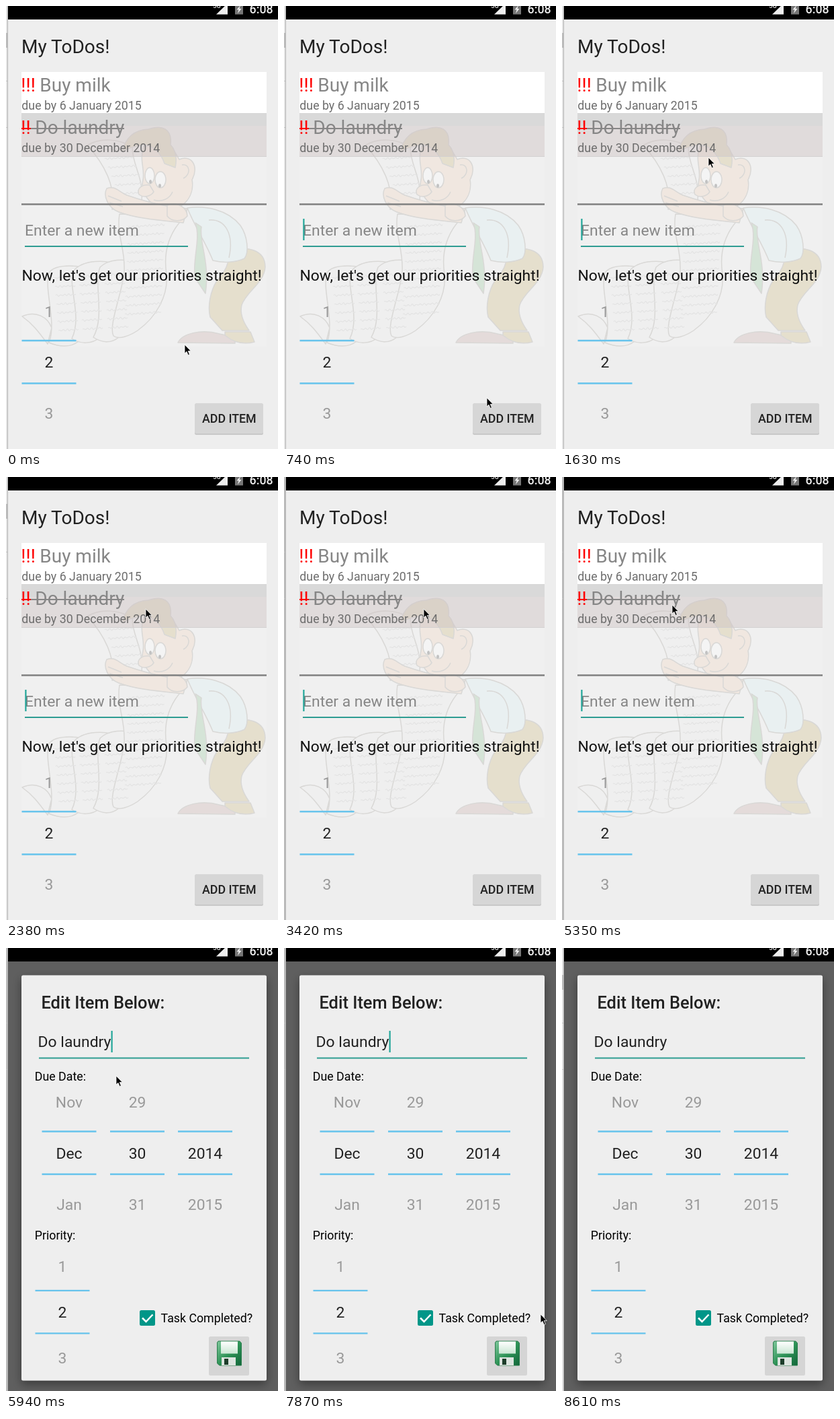
An HTML page that plays this animation: 405 by 658 pixels, repeating every 8660 ms.

```html
<!DOCTYPE html>
<html lang="en">
<head>
<meta charset="utf-8">
<title>To-do list</title>
<style>
  html, body { margin: 0; width: 100%; height: 100%; overflow: hidden; background: #eee; }
  svg { display: block; width: 405px; height: 658px; font: 22.9px Roboto, sans-serif; fill: #212121; }
  .big { font-size: 28px; }
  .small { font-size: 17.8px; }
  .medium { font-weight: 500; }
  .mid { text-anchor: middle; }
  .gray { fill: #868686; }
  .red { fill: #f00; }
  .art { stroke: #d9d8d6; stroke-width: 1.5; stroke-linejoin: round; }
  .paper { fill: #efefef; }
  .skin { fill: #f0e7e0; }
  .tan { fill: #e5dfcd; }
</style>
</head>
<body>
<svg viewBox="0 0 405 658">
  <defs>
    <filter id="shadow" x="-10%" y="-10%" width="120%" height="120%">
      <feDropShadow dx="0" dy="5" stdDeviation="7" flood-opacity=".4"/>
    </filter>
    <linearGradient id="green" x2="1" y2="1">
      <stop stop-color="#7fc79b"/><stop offset=".5" stop-color="#2f9458"/><stop offset="1" stop-color="#12673a"/>
    </linearGradient>
    <linearGradient id="label" y2="1" x2="0">
      <stop stop-color="#fff"/><stop offset="1" stop-color="#c9e6d3"/>
    </linearGradient>
  </defs>
  <rect width="405" height="658" fill="#eee"/>

  <g id="list">
    <rect x="23" y="178" width="365" height="328" fill="#f0f0f0"/>
    <g class="art">
      <!-- paper scroll -->
      <path class="paper" d="M24 461C45 452 62 462 68 478L62 502C50 486 42 474 24 461Z"/>
      <path class="paper" d="M64 500C76 470 56 420 64 396C74 382 116 384 126 394C106 420 128 462 108 498C96 508 78 506 64 500Z"/>
      <path class="paper" d="M98 494C114 462 92 416 100 394C114 376 152 376 168 386C144 416 164 462 140 492C128 503 110 502 98 494Z"/>
      <path class="paper" d="M130 492C148 460 130 414 140 388C152 376 178 374 192 382C174 416 192 460 168 492C156 502 142 500 130 492Z"/>
      <path class="paper" d="M169 309L268 311C242 336 234 366 239 398C242 430 224 462 196 482C184 490 168 496 160 490C152 474 174 424 176 394C178 360 164 340 169 309Z"/>
      <path class="paper" d="M121 207C140 195 170 197 188 210C188 238 208 258 201 296L158 302C164 268 146 234 121 207Z"/>
      <path id="scribble" fill="none" stroke="#e3e3e3" stroke-width="1.2"/>
      <!-- trousers and shoes -->
      <path class="tan" d="M330 366C358 354 386 362 386 388C384 412 358 424 351 444C348 456 352 468 362 482H322L304 462C300 446 304 424 314 408C326 394 334 382 330 366Z"/>
      <path fill="#e4dbda" d="M256 500C262 487 290 479 318 487L341 492V501Z"/>
      <path class="tan" d="M326 484H364L370 499C355 503 340 501 326 489Z"/>
      <!-- shirt and tie -->
      <path fill="#e9f0f1" d="M270 300C296 296 330 302 349 326C360 342 362 366 355 375C342 381 324 382 308 378C298 352 282 330 270 300Z"/>
      <path fill="none" d="M302 318C326 316 340 338 332 374"/>
      <path fill="#d5e4d7" d="M282 322L291 328C287 350 304 380 297 427L281 403C278 374 290 346 282 322Z"/>
      <!-- head -->
      <path class="skin" d="M205 208C198 230 207 240 204 258C200 276 212 294 232 302C258 308 282 286 277 258C288 238 276 220 258 228L246 208Z"/>
      <path class="tan" d="M173 216C178 196 190 184 212 183C232 176 248 182 245 206C253 215 255 226 252 240L236 234C232 222 222 207 205 206C192 208 182 211 173 216Z"/>
      <path fill="none" d="M262 236C274 234 276 250 264 256"/>
      <ellipse cx="214" cy="252" rx="7" ry="12" fill="#f4f4f4"/>
      <ellipse cx="230" cy="258" rx="8" ry="12" fill="#f4f4f4"/>
      <path fill="#c2c2c2" stroke="none" d="M215 258a2 3 0 1 0 .1 0ZM229 264a2 3 0 1 0 .1 0Z"/>
      <path class="skin" d="M214 266C202 264 194 272 198 280C206 286 216 282 220 276Z"/>
      <path fill="none" d="M220 288C232 292 244 286 248 276"/>
      <!-- hands -->
      <path class="skin" d="M150 271C162 266 168 276 180 281C200 288 222 294 244 298L270 301L264 322C226 318 196 316 168 306C152 300 144 282 150 271Z"/>
      <path class="skin" d="M240 296C252 290 270 298 270 312C262 322 246 320 240 312Z"/>
      <path fill="none" d="M152 282L172 290M154 292L174 298"/>
    </g>

    <rect x="23" y="98" width="365" height="61" fill="#fff"/>
    <path d="M23 160H388" stroke="#d8d8d8" stroke-width="2"/>
    <rect x="23" y="161" width="365" height="17" fill="#d9d9d9"/>
    <rect x="23" y="178" width="365" height="45" fill="#ccc1c0" fill-opacity=".45"/>
    <path d="M23 223.5H388" stroke="#d2d0d0"/>

    <text class="big" x="23" y="70">My ToDos!</text>
    <text class="big red" x="22.3" y="127">!!!</text>
    <text class="big gray" x="50.3" y="127">Buy milk</text>
    <text class="small" x="23.3" y="154" fill="#6d6d6d">due by 6 January 2015</text>
    <text class="big red" x="22.3" y="190">!!</text>
    <text class="big gray" x="43.3" y="190">Do laundry</text>
    <path d="M23 182H37" stroke="#f00" stroke-width="2"/>
    <path d="M37 182H176" stroke="#868686" stroke-width="2"/>
    <text class="small" x="23.3" y="217" fill="#6d6d6d">due by 30 December 2014</text>
    <path d="M23 294.5H388" stroke="#808080" stroke-width="2.5"/>
    <text class="gray" x="28" y="341">Enter a new item</text>
    <path d="M28 357H271" stroke="#2f9d92" stroke-width="2"/>
    <text x="23.4" y="408" fill="#111">Now, let's get our priorities straight!</text>
    <rect x="281" y="591" width="102" height="46" rx="2.5" fill="#c8c8c8"/>
    <rect x="281" y="590" width="102" height="45" rx="2.5" fill="#d6d6d6"/>
    <text class="small medium mid" x="332.3" y="619">ADD ITEM</text>
    <rect class="caret" x="28.3" y="316" width="2.2" height="32" fill="#22a699"/>
  </g>

  <g id="dialog">
    <rect x="3" y="20" width="402" height="638" fill="#5f5f5f"/>
    <rect x="23" y="40.5" width="365" height="602" rx="2.5" fill="#eee" filter="url(#shadow)"/>
    <text class="medium" x="52.5" y="90" font-size="25.4">Edit Item Below:</text>
    <text x="47.6" y="147">Do laundry</text>
    <path d="M49 163.5H362" stroke="#2f9d92" stroke-width="2"/>
    <text class="small" x="42.8" y="197" fill="#000">Due Date:</text>
    <text class="small" x="42.8" y="433" fill="#000">Priority:</text>
    <rect x="199" y="538" width="23" height="23" rx="2.5" fill="#009688"/>
    <path d="M203 549.5L208.5 555L218.5 544.5" fill="none" stroke="#fff" stroke-width="2.5"/>
    <text class="small" x="230.5" y="556" fill="#000">Task Completed?</text>
    <rect x="302" y="577" width="60" height="58" rx="2.5" fill="#d5d5d5"/>
    <path d="M316 584H348L350.5 587V620H318L314.5 617V586Z" fill="url(#green)" stroke="#2a7d4c"/>
    <rect x="320" y="584.5" width="25" height="18" fill="url(#label)"/>
    <rect x="321" y="608" width="21" height="12" fill="#dde5e0"/>
    <rect x="325" y="610" width="6" height="9" fill="#1d3d2a"/>
    <rect class="caret" x="156.5" y="123" width="2.2" height="32" fill="#22a699"/>
  </g>

  <rect x="3" width="402" height="20" fill="#000"/>
  <g fill="#eee">
    <text class="medium" x="308.5" y="3" font-size="9">3G</text>
    <path d="M330 -4V12.5H313Z"/>
    <rect x="341" y="-4" width="12" height="16.5" fill="#777"/>
    <path d="M349 -1L343.5 5.5H346.5L345 11L350.5 4H347.5Z"/>
    <text class="small medium" x="362.6" y="11">6:08</text>
  </g>

  <rect id="strip" width="3" height="658"/>
  <path d="M0 40H2V62H0Z" fill="#bdbdbd"/>
  <path d="M0 111.5H2M0 180.5H2" stroke="#c6c6c6"/>
  <path d="M2.5 0V658" stroke="#b4b4b4"/>
  <path id="cursor" d="M0 0V13L3 10.3L5.2 15.5L7.4 14.6L5.2 9.6H9.3Z" fill="#000" stroke="#fff" stroke-width=".8"/>
</svg>
<script>
const LOOP = 8660, DIALOG_AT = 5940;
const $ = id => document.getElementById(id);

// Wheel picker: three values, two blue lines around the middle one
function picker(parent, x, line, labels, rows) {
  const texts = labels.map((label, i) =>
    `<text class="mid" x="${x}" y="${rows[i]}" fill="${i === 1 ? '#212121' : '#999'}">${label}</text>`);
  $(parent).insertAdjacentHTML('beforeend', texts.join('') +
    `<path d="M${x - 40.5} ${line}h81m-81 63.5h81" stroke="#66c3ec" stroke-width="2.3"/>`);
}
const dateRows = [237, 313, 389];
picker('list', 64, 497, [1, 2, 3], [462, 537.4, 613]);
picker('dialog', 94, 272.5, ['Nov', 'Dec', 'Jan'], dateRows);
picker('dialog', 195.5, 272.5, [29, 30, 31], dateRows);
picker('dialog', 296.5, 272.5, ['', 2014, 2015], dateRows);
picker('dialog', 84, 508.8, [1, 2, 3], [481, 549, 617]);

// Handwriting on the scroll: wavy rows
function scribble(x, y, width, rows, lean, gap = 13) {
  let d = '';
  for (let r = 0; r < rows; r++) {
    d += `M${x + lean * r} ${y + gap * r}`;
    for (let i = 0; i < width / 6; i++) d += `q1.5 ${-1 - (i * 7 + r) % 3} 3 0t3 -.4`;
  }
  return d;
}
$('scribble').setAttribute('d',
  scribble(142, 214, 38, 6, 5) + scribble(182, 328, 52, 11, -.5) +
  scribble(72, 404, 28, 7, 1) + scribble(108, 402, 30, 7, 1) + scribble(146, 400, 26, 7, 1));

// Pointer stops: time, x, y
const stops = [
  [0, 266, 503], [150, 267, 505], [300, 273, 516], [440, 283, 536], [590, 294, 561],
  [740, 302, 582], [890, 305, 592], [1190, 300, 440], [1340, 292, 277], [1630, 218, 225],
  [1780, 212, 208], [1930, 208, 196], [4160, 195, 194], [4310, 176, 191], [4460, 164, 190],
  [7430, 270, 310], [7570, 376, 432], [7870, 382, 544], [8020, 390, 594], [8170, 396, 638],
  [8320, 420, 670]
];
// The caret turns on and off in turn, starting hidden
const blinks = [440, 890, 1340, 1930, 2380, 2820, 3420, 3860, 4460, 4900, 5350, 6390, 6830, 7430, 7870, 8320];
const carets = document.querySelectorAll('.caret');
const show = (el, on) => el.setAttribute('visibility', on ? 'visible' : 'hidden');

function draw(now) {
  const t = now % LOOP;
  const [, x, y] = stops.findLast(stop => stop[0] <= t);
  $('cursor').setAttribute('transform', `translate(${x} ${y})`);
  const caretOn = blinks.filter(b => b <= t).length % 2 === 1;
  carets.forEach(caret => caret.style.opacity = caretOn ? 1 : 0);
  show($('list'), t < DIALOG_AT);
  show($('dialog'), t >= DIALOG_AT);
  $('strip').setAttribute('fill', t >= 2670 && t < 8610 ? '#bdbdbd' : '#e4e4e4');
  requestAnimationFrame(draw);
}
draw(0);
</script>
</body>
</html>
```
